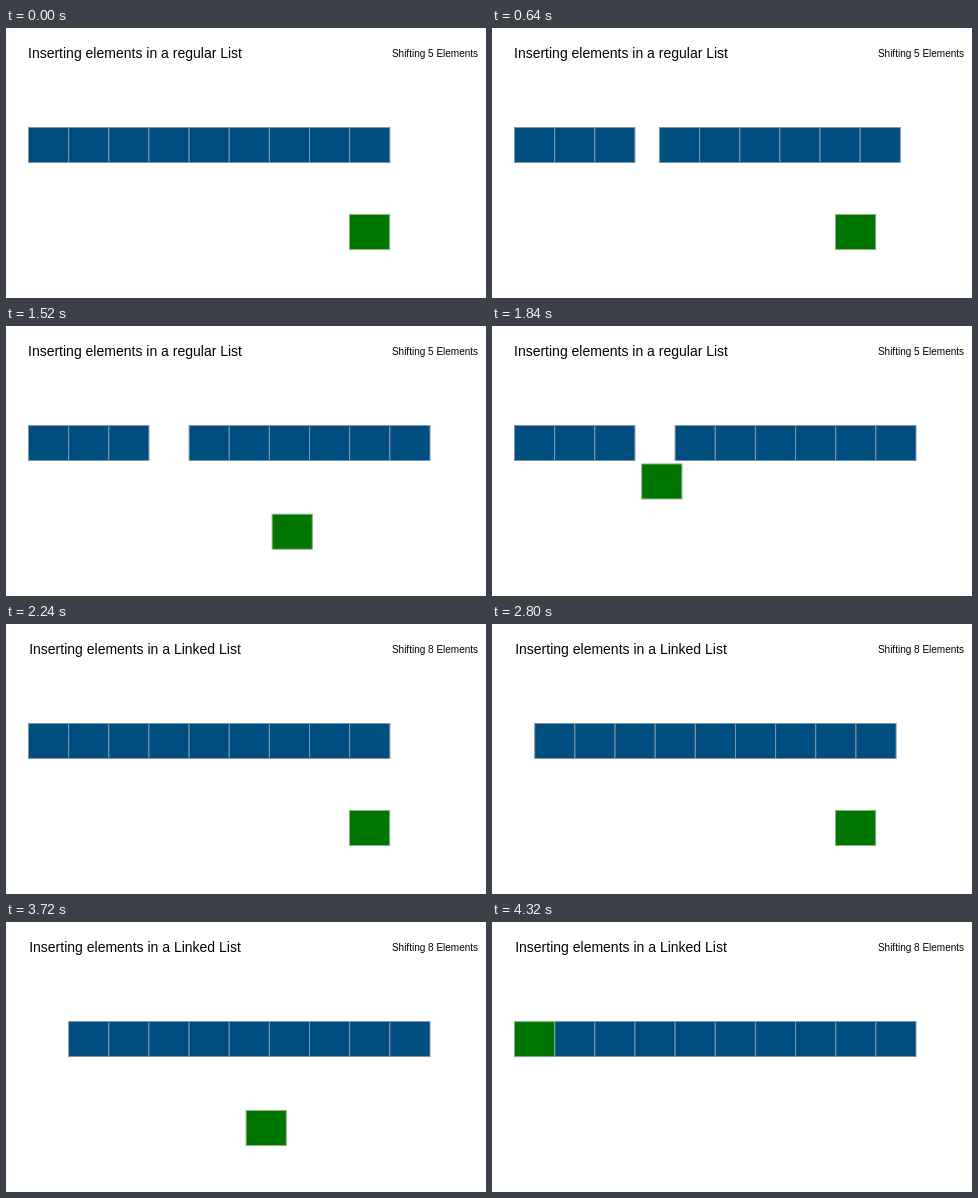
Write an HTML page that moves like this. It is 480 px wide and 270 px high and loops after 4.44 s.

```html
<!DOCTYPE html>
<html lang="en">
<head>
<meta charset="utf-8">
<title>Inserting elements</title>
<style>
  html, body { margin: 0; width: 100%; height: 100%; overflow: hidden; background: #fff; }
  svg { display: block; width: 480px; height: 270px; }
  text { font-family: "Liberation Sans", Arial, sans-serif; text-anchor: middle; fill: #000; }
  rect { stroke: #8296a1; stroke-width: 1; }
  .cell { fill: #004d80; }
  #item { fill: #007500; stroke: #84b084; }
</style>
</head>
<body>
<svg viewBox="0 0 480 270">
  <text id="title" x="129" y="30" font-size="14"></text>
  <text id="count" x="429" y="29" font-size="10"></text>
  <g id="cells"></g>
  <rect id="item" x="343.5" y="186.5" width="40.15" height="35"/>
</svg>
<script>
const LOOP = 4440, TICK = 40, MOVE = 980, PITCH = 40.15;
const $ = id => document.getElementById(id);
const NS = "http://www.w3.org/2000/svg";

function make(tag, attrs) {
  const el = document.createElementNS(NS, tag);
  for (const k in attrs) el.setAttribute(k, attrs[k]);
  return el;
}

// Each scene opens a gap at cell `from`, then carries the new item into it.
const scenes = [
  { start: 0, shift: 93, carry: 1135, from: 3, list: "regular", moved: 5,
    d: "M0 0C-40 2.5 -70 2.5 -90 1C-125 0 -146 -6 -162 -15.5C-190 -32 -201.5 -55 -201 -87" },
  { start: 2240, shift: 2308, carry: 3354, from: 0, list: "Linked", moved: 8,
    d: "M0 0C-70 2.5 -130 2.5 -190 1C-240 0 -265 -5 -282 -15C-310 -32 -321.5 -55 -321 -87" }
];
for (const s of scenes) {
  s.path = make("path", { d: s.d });
  s.length = s.path.getTotalLength();
}

const cells = Array.from({ length: 9 }, (_, i) => $("cells").appendChild(
  make("rect", { class: "cell", x: 22.5 + i * PITCH, y: 99.5, width: PITCH, height: 35 })));

const ease = u => u < 0.5 ? 2 * u * u : 1 - 2 * (1 - u) ** 2;
const progress = (t, from) => ease(Math.min(1, Math.max(0, (t - from) / MOVE)));

let current;
function draw(t) {
  const s = t < scenes[1].start ? scenes[0] : scenes[1];
  if (s !== current) {
    current = s;
    $("title").textContent = `Inserting elements in a ${s.list} List`;
    $("count").textContent = `Shifting ${s.moved} Elements`;
  }
  const dx = PITCH * progress(t, s.shift);
  cells.forEach((c, i) => c.setAttribute("transform", `translate(${i < s.from ? 0 : dx} 0)`));
  const p = s.path.getPointAtLength(s.length * progress(t, s.carry));
  $("item").setAttribute("transform", `translate(${p.x} ${p.y})`);
}

const origin = performance.now();
function frame() {
  const t = (performance.now() - origin) % LOOP;
  draw(Math.floor(t / TICK) * TICK);
  requestAnimationFrame(frame);
}
frame();
</script>
</body>
</html>
```
